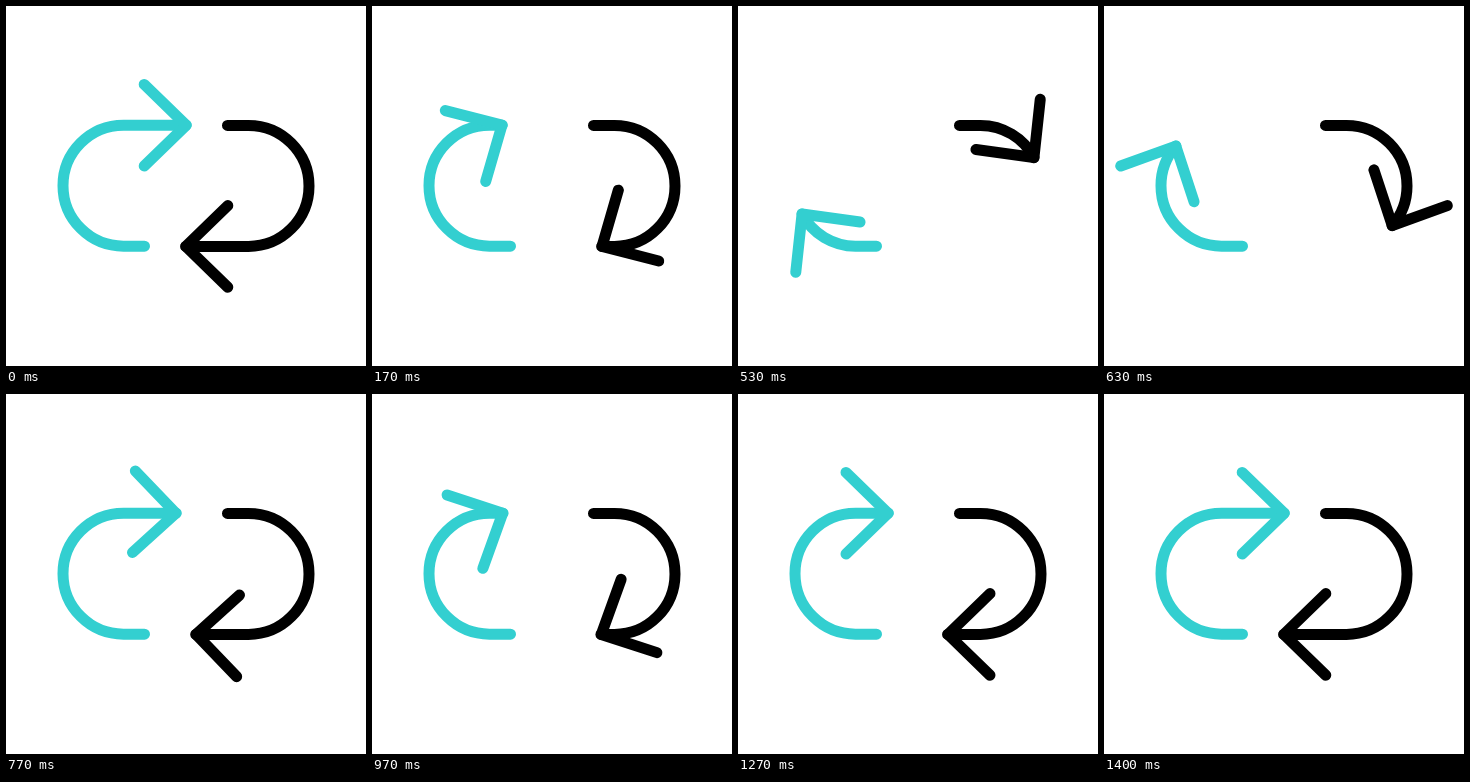
Write an HTML page that moves like this. It is 360x360 px and loops after 2 s.

```html
<!DOCTYPE html>
<html lang="en">
<head>
<meta charset="utf-8">
<title>Looping arrows</title>
<style>
  html, body { margin: 0; width: 100%; height: 100%; overflow: hidden; background: #fff; }
  svg { display: block; width: 100%; height: 100%; }
  path { fill: none; stroke-width: 11; stroke-linecap: round; stroke-linejoin: round; }
</style>
</head>
<body>
<svg viewBox="0 0 360 360">
  <defs>
    <g id="arrow">
      <path id="shaft" d="M138.5 240.2H117.5A60.5 60.5 0 0 1 117.5 119.2H180.2"/>
      <path id="head" d="M-42 -40.8L0 0L-42 40.8"/>
    </g>
  </defs>
  <use href="#arrow" stroke="#33cfd0"/>
  <use href="#arrow" stroke="#000" transform="rotate(180 180 179.8)"/>
</svg>
<script>
  const LOOP = 2000, FPS = 30;
  const shaft = document.getElementById('shaft');
  const head = document.getElementById('head');
  const full = shaft.getTotalLength();

  // Keys are [frame, value, slope per frame].
  const reach = [
    [0, full, 0], [15, 80, 0], [24, 270, 0], [31, 213, 0],
    [38, 243.6, 7.5], [42, full, 0]
  ];
  const heading = [
    [0, 0, 0], [16, -128, 0], [18, -86, 20], [23, 2, 0],
    [29.5, -26.5, 0], [37, 0, 0]
  ];

  // Cubic Hermite interpolation between keys.
  function sample(keys, f) {
    const i = keys.findIndex(k => k[0] > f);
    if (i < 0) return keys[keys.length - 1][1];
    const [f0, v0, m0] = keys[i - 1];
    const [f1, v1, m1] = keys[i];
    const d = f1 - f0, u = (f - f0) / d, w = 1 - u;
    const ease = u * u * (3 - 2 * u);
    return v0 + (v1 - v0) * ease + d * u * w * (m0 * w - m1 * u);
  }

  function draw(now) {
    // The motion advances in whole frames, on times rounded to 10 ms.
    const f = Math.floor((now % LOOP + 4) * FPS / 1000);
    const len = sample(reach, f);
    const tip = shaft.getPointAtLength(len);
    shaft.setAttribute('stroke-dasharray', `${len} 999`);
    head.setAttribute('transform',
      `translate(${tip.x} ${tip.y}) rotate(${sample(heading, f)})`);
  }

  function tick(now) {
    draw(now);
    requestAnimationFrame(tick);
  }
  draw(0);
  requestAnimationFrame(tick);
</script>
</body>
</html>
```
